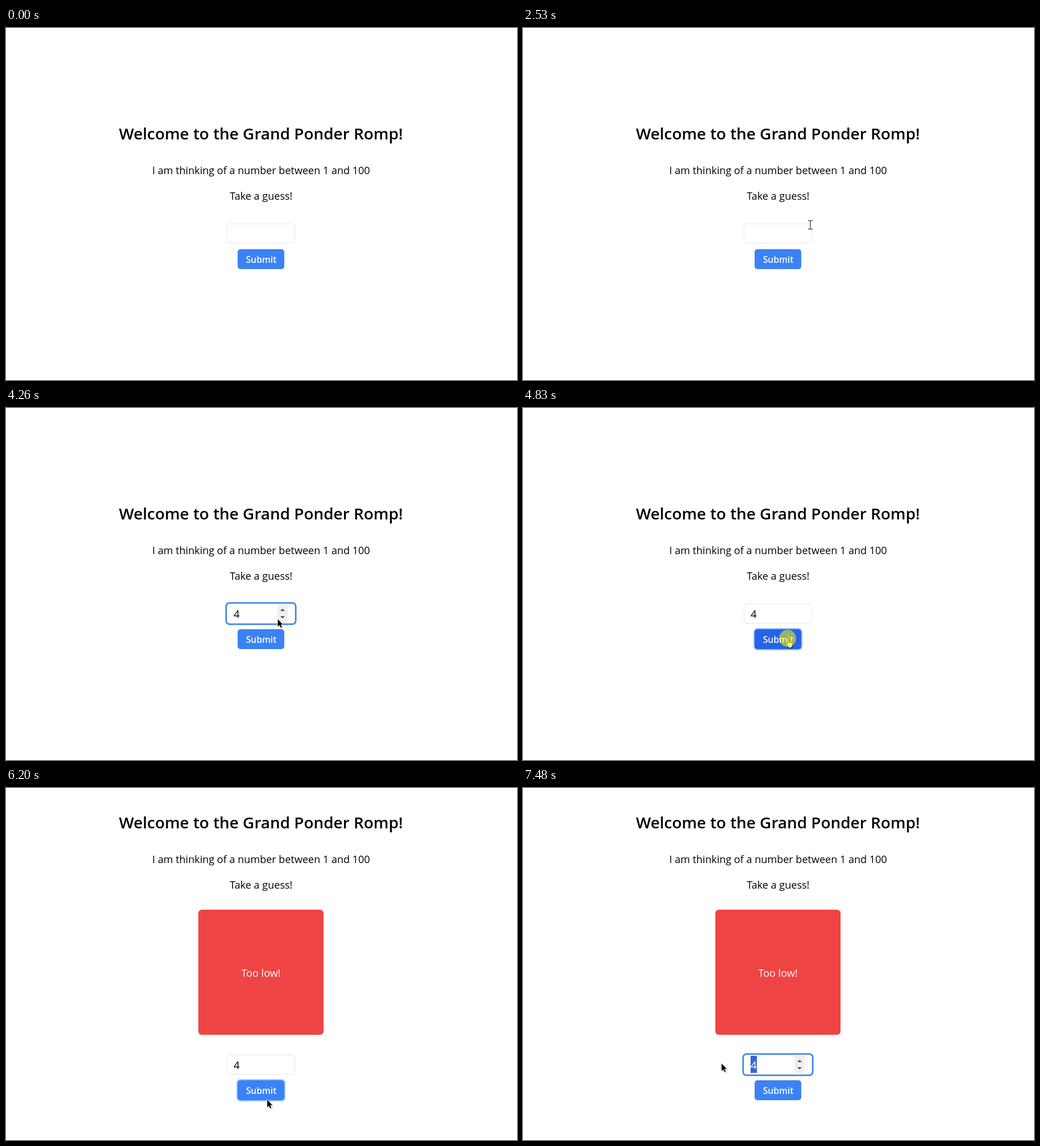
An HTML page that plays this animation: 898 px wide and 619 px high, repeating every 8 s.

```html
<!DOCTYPE html>
<html lang="en">
<head>
<meta charset="utf-8">
<title>Number guessing</title>
<style>
  html, body { margin: 0; width: 100%; height: 100%; overflow: hidden; background: #fff; }
  svg { display: block; width: 100%; height: 100%; font: 18.05px "Open Sans", "Noto Sans", sans-serif; }
  .middle { text-anchor: middle; }
  .semibold { font-weight: 600; }
  .outlined { stroke: #fff; stroke-width: 1.5; paint-order: stroke; stroke-linejoin: round; }
  #arrow { filter: drop-shadow(1px 1px 1px #0004); }
</style>
</head>
<body>
<svg viewBox="0 0 898 619">
  <g id="intro" class="middle">
    <text class="semibold" x="448" y="196" font-size="27.9">Welcome to the Grand Ponder Romp!</text>
    <text x="448.3" y="257">I am thinking of a number between 1 and 100</text>
    <text x="448.3" y="302">Take a guess!</text>
  </g>
  <g id="card" class="middle">
    <rect x="338" y="214" width="220" height="220" rx="6" fill="#ef4444"/>
    <text x="448" y="332" fill="#fff">Too low!</text>
  </g>
  <g id="form">
    <rect x="388.5" y="344.5" width="119" height="34" rx="4.5" fill="#fff" stroke="#e5e7eb"/>
    <rect id="inputRing" x="386.75" y="342.75" width="122.5" height="37.5" rx="6" fill="none" stroke="#3b82f6" stroke-width="2.5"/>
    <rect id="selection" x="400" y="346" width="11" height="30" fill="#3367d1"/>
    <text id="value" x="400" y="369" font-size="18.7"></text>
    <g id="spinner">
      <rect x="477" y="346" width="18" height="30" fill="#efefef"/>
      <rect id="spinnerUp" x="477" y="346" width="18" height="15" fill="#c8c8c8"/>
      <path d="M482 357l4-4 4 4zM482 366l4 4 4-4z" fill="#505050"/>
    </g>
    <rect id="buttonRing" x="405" y="387" width="86" height="39" rx="7" fill="#93c5fd"/>
    <rect id="button" x="407" y="389" width="82" height="35" rx="5"/>
    <text class="middle semibold" x="448.5" y="413" font-size="15.6" fill="#fff">Submit</text>
  </g>
  <g id="pointer">
    <path id="arrow" class="outlined" d="M0 .5V13.6L3 10.8 5.1 15.5 7.1 14.6 5.1 10H9Z"/>
    <path id="ibeam" class="outlined" d="M-4-8h3l1 1 1-1h3v1h-3l-.5 1V6l.5 1h3v1h-3l-1-1-1 1h-3V7h3l.5-1V-6l-.5-1h-3z"/>
    <path id="hand" fill="#fff" stroke="#000" stroke-linejoin="round"
      d="M-.5 0q1.5-1.6 3 0v5q1.3-1 2.5.5 1.3-1 2.4.6 1.6-.5 1.8 1.2v4l-1.7 3v2.5h-6.5v-2.5l-4.2-5q0-2 2-1.3l1.2 1.3zM2.5 5v4M5 6v3M7.4 6.5V9"/>
    <circle id="press" r="15" fill="#ff0" fill-opacity=".52"/>
  </g>
</svg>
<script>
const LOOP = 8000, ENTER = 1480, SUBMIT = 4830, RESULT = 4910, DRAG = 6820, SELECTED = 7000, RELEASE = 7320;
const SPIN = { start: 3560, every: 155, hold: 90, delay: 50, clicks: 4 };
const part = Object.fromEntries([...document.querySelectorAll("[id]")].map(e => [e.id, e]));

// Each move bends through its control point and slows down towards its end.
const entry = [834, 583];
const moves = [
  { start: ENTER, end: 1980, via: [740, 350], to: [371, 336] },
  { start: 1980, end: 2290, via: [375, 325], to: [394, 325] },
  { start: 2290, end: 2530, via: [470, 325], to: [505, 346] },
  { start: 2530, end: 3070, via: [500, 372], to: [488, 362] },
  { start: 3110, end: 3500, via: [485, 357], to: [481, 354] },
  { start: 4170, end: 4660, via: [476, 385], to: [465, 405] },
  { start: 5660, end: 6050, via: [465, 480], to: [481, 540] },
  { start: 6050, end: 6440, via: [447, 560], to: [465, 534] },
  { start: 6480, end: 7200, via: [428, 468], to: [388, 494] },
  { start: RELEASE, end: 7480, via: [370, 490], to: [349, 484] }
];

const within = (t, start, end) => t >= start && t < end;
const show = (element, on) => element.style.display = on ? "" : "none";
const shift = (element, x, y) => element.setAttribute("transform", `translate(${x} ${y})`);

function pointerAt(t) {
  let from = entry;
  for (const { start, end, via, to } of moves) {
    if (t < start) break;
    if (t < end) {
      const k = Math.sin((t - start) / (end - start) * Math.PI / 2);
      return from.map((a, i) => (1 - k) ** 2 * a + 2 * k * (1 - k) * via[i] + k * k * to[i]);
    }
    from = to;
  }
  return from;
}

function spinnerState(t) {
  const since = t - SPIN.start;
  const click = Math.floor(since / SPIN.every);
  const count = Math.floor((since - SPIN.delay) / SPIN.every) + 1;
  return {
    value: Math.max(0, Math.min(SPIN.clicks, count)),
    held: within(click, 0, SPIN.clicks) && since % SPIN.every < SPIN.hold
  };
}

function render(t) {
  const submitted = t >= RESULT;
  const drop = submitted ? 125 : 0;
  const [x, y] = pointerAt(t);
  const formY = y - drop;
  const visible = t >= ENTER;
  const overInput = visible && within(x, 388, 508) && within(formY, 344, 379);
  const overSpinner = overInput && within(x, 477, 495);
  const overButton = visible && within(x, 407, 489) && within(formY, 389, 422);
  const { value, held } = spinnerState(t);
  const inputFocus = value > 0 && !within(t, SUBMIT, DRAG);
  const selected = t >= SELECTED;

  shift(part.intro, 0, -drop);
  shift(part.form, 0, drop);
  show(part.card, submitted);

  show(part.inputRing, inputFocus);
  show(part.spinner, inputFocus || (overInput && x < 504));
  show(part.spinnerUp, overSpinner && formY < 361);
  show(part.selection, selected);
  part.value.textContent = value || "";
  part.value.setAttribute("fill", selected ? "#fff" : "#000");

  show(part.buttonRing, within(t, SUBMIT, DRAG));
  part.button.setAttribute("fill", overButton ? "#2563eb" : "#3b82f6");

  const ibeam = overInput && !overSpinner;
  show(part.pointer, visible);
  shift(part.pointer, x, y);
  show(part.arrow, !ibeam && !overButton);
  show(part.ibeam, ibeam);
  show(part.hand, overButton);
  show(part.press, held || within(t, SUBMIT, RESULT) || within(t, DRAG, RELEASE));
}

const start = performance.now();
function tick() {
  render((performance.now() - start) % LOOP);
  requestAnimationFrame(tick);
}
tick();
</script>
</body>
</html>
```
